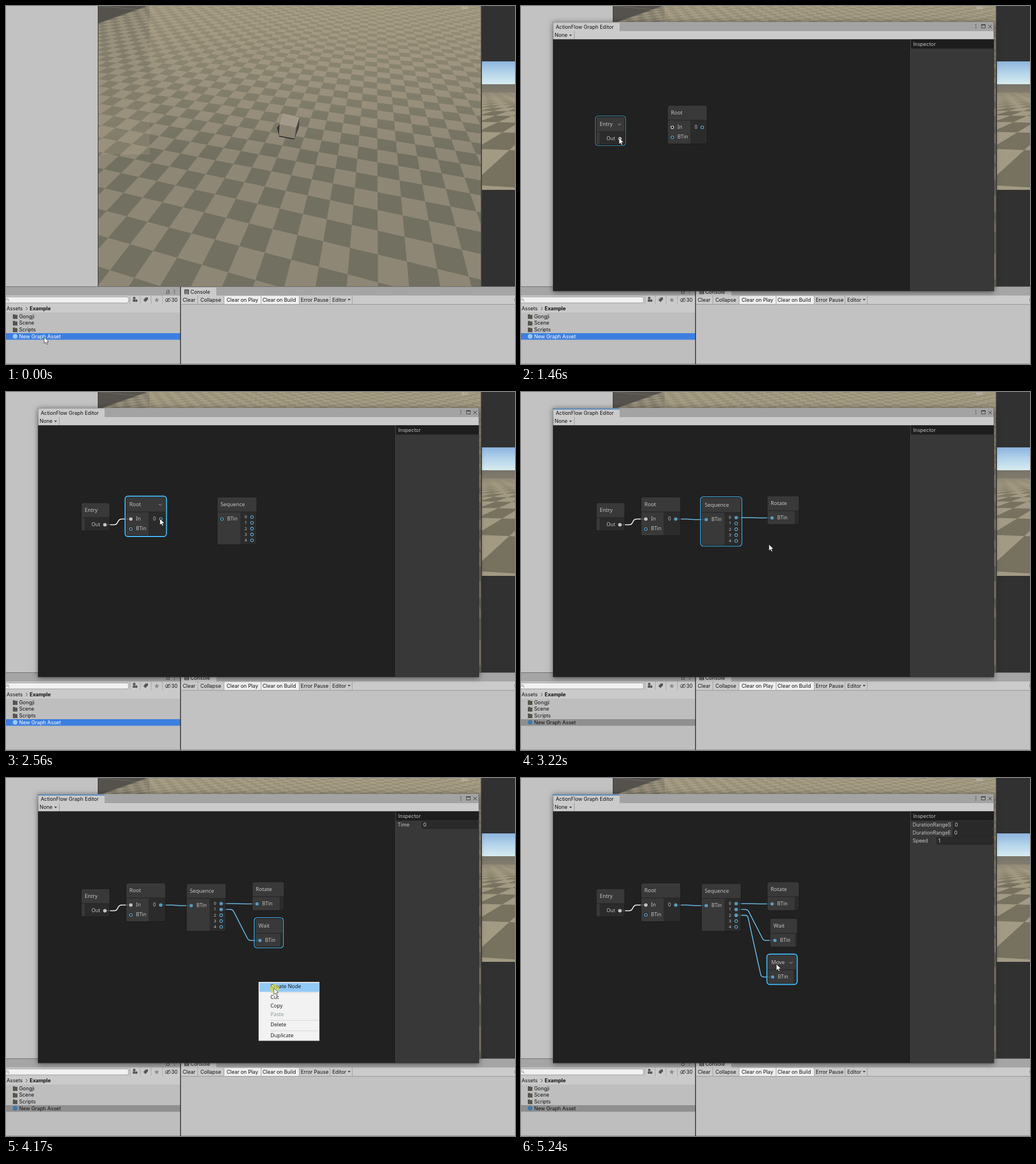
These frames come from a looping animation (893x627 px, 6.27 s). An HTML page with a canvas:

```html
<!DOCTYPE html>
<html lang="en">
<head>
<meta charset="utf-8">
<title>Graph editor demo</title>
<style>
  html, body { margin: 0; width: 100%; height: 100%; overflow: hidden; background: #c2c2c2; }
  canvas { display: block; width: 893px; height: 627px; }
</style>
</head>
<body>
<canvas id="stage" width="893" height="627"></canvas>
<script>
const ctx = document.getElementById('stage').getContext('2d');
const UI = '8.9px Inter, sans-serif';
const TITLE = '9.3px "Noto Sans", sans-serif';
const PORT = '8.7px "Noto Sans", sans-serif';
const SMALL = '7.6px "Noto Sans", sans-serif';
const MENU = '9.2px "Open Sans", sans-serif';
const BLUE = '#6cb9e6', WHITE = '#f2f2f2', SELECT = '#44b8f4';

// Timing: [start ms, end ms, number of steps]; everything below is scheduled in steps.
const LOOP = 6270;
const BURSTS = [[110, 670, 6], [780, 1340, 6], [1460, 2040, 6], [2160, 2680, 6],
  [2790, 3330, 6], [3430, 3950, 6], [4070, 4690, 7], [4810, 5240, 5]];

function stepAt(ms) {
  let step = 0;
  for (const [start, end, count] of BURSTS) {
    if (ms < start) break;
    const size = (end - start) / (count - 1);
    step += 1 + Math.min(count - 1, Math.floor((ms - start + 20) / size));
    if (ms < end) break;
  }
  return step;
}

// Piecewise linear position from [step, x, y] keys.
function along(keys, step) {
  const next = keys.findIndex(k => k[0] > step);
  if (next === 0) return keys[0].slice(1);
  if (next < 0) return keys[keys.length - 1].slice(1);
  const [a, ax, ay] = keys[next - 1], [b, bx, by] = keys[next];
  const u = (step - a) / (b - a);
  return [ax + (bx - ax) * u, ay + (by - ay) * u];
}
const within = (ranges, step) => ranges.find(r => step >= r[0] && step < r[1]);

const CURSOR = [[0, 67, 580], [2, 67, 580], [5, 255, 175], [6, 255, 175], [7, 280, 184], [9, 280, 184],
  [13, 172, 231], [14, 190, 228], [16, 265, 212], [17, 285, 187], [18, 238, 197], [19, 370, 184],
  [20, 397, 194], [22, 397, 194], [23, 270, 222], [24, 340, 222], [25, 395, 197], [26, 341, 198],
  [27, 432, 182], [28, 405, 220], [29, 435, 267], [30, 435, 267], [31, 462, 277], [33, 462, 277],
  [34, 410, 262], [35, 445, 306], [36, 458, 259], [37, 443, 357], [38, 470, 368], [40, 470, 368],
  [42, 377, 240], [45, 452, 396], [46, 458, 373], [48, 448, 326]];
const CLICKS = [1, 2, 8, 21, 27, 32, 38, 39];
const MENUS = [[6, 9, 255, 175], [19, 22, 370, 184], [27, 28, 432, 182], [30, 33, 435, 267], [37, 41, 443, 357]];
const FOCUS = [[14, 21], [24, 27], [29, 32], [35, 40], [43, 99]];
const SELECTED = [[14, 17, 'Entry'], [17, 25, 'Root'], [25, 36, 'Sequence'], [36, 43, 'Wait'],
  [43, 46, 'Sequence'], [46, 99, 'Move']];
const WINDOW_OPENS = 3;

// split: width of the input column
const NODES = {
  Entry: { born: 3, w: 50, h: 49, split: 6, keys: [[0, 132, 194]] },
  Root: { born: 11, w: 69.5, h: 67.5, split: 40, keys: [[17, 257, 174], [18, 210.5, 184]] },
  Sequence: { born: 22, w: 69.5, h: 83.5, split: 41, keys: [[25, 370.5, 184], [26, 316.5, 185]] },
  Rotate: { born: 28, w: 56, h: 50, split: 48, keys: [[0, 432, 182]] },
  Wait: { born: 33, w: 48, h: 50, split: 44, keys: [[35, 437, 267], [36, 437, 246]] },
  Move: { born: 41, w: 50, h: 50, split: 45, keys: [[46, 443, 357], [48, 433, 310]] }
};
// Drag starts at `from`, connects at `to`.
const EDGES = [
  { a: 'Entry', out: 0, b: 'Root', from: 14, to: 16, color: WHITE },
  { a: 'Root', out: 0, b: 'Sequence', from: 24, to: 25, color: BLUE },
  { a: 'Sequence', out: 0, b: 'Rotate', from: 28, to: 29, color: BLUE },
  { a: 'Sequence', out: 1, b: 'Wait', from: 34, to: 35, color: BLUE },
  { a: 'Sequence', out: 2, b: 'Move', from: 43, to: 45, color: BLUE }
];
const FIELDS = {
  Wait: [['Time', '0', 730]],
  Move: [['DurationRangeS', '0', 759], ['DurationRangeE', '0', 758], ['Speed', '1', 730]]
};

function rect(x, y, w, h, color) {
  ctx.fillStyle = color;
  ctx.fillRect(x, y, w, h);
}
function text(str, x, y, color = '#111', font = UI) {
  ctx.font = font;
  ctx.fillStyle = color;
  ctx.textBaseline = 'middle';
  ctx.fillText(str, x, y);
}
function poly(points, fill) {
  ctx.beginPath();
  points.forEach(p => ctx.lineTo(...p));
  ctx.closePath();
  ctx.fillStyle = fill;
  ctx.fill();
}
function stroke(points, color, width = 1) {
  ctx.beginPath();
  points.forEach(p => ctx.lineTo(...p));
  ctx.strokeStyle = color;
  ctx.lineWidth = width;
  ctx.stroke();
}
function disc(x, y, r, color) {
  ctx.beginPath();
  ctx.arc(x, y, r, 0, 7);
  ctx.fillStyle = color;
  ctx.fill();
}
function roundBox(x, y, w, h, r, fill, line, width = 1) {
  ctx.beginPath();
  ctx.roundRect(x, y, w, h, r);
  if (fill) { ctx.fillStyle = fill; ctx.fill(); }
  if (line) { ctx.strokeStyle = line; ctx.lineWidth = width; ctx.stroke(); }
}
function fade(x, y, w, h, ...stops) {
  const g = ctx.createLinearGradient(0, y, 0, y + h);
  stops.forEach((c, i) => g.addColorStop(i / (stops.length - 1), c));
  rect(x, y, w, h, g);
}
const arrowDown = (x, y) => poly([[x, y], [x + 5, y], [x + 2.5, y + 3]], '#444');

// Checkered plane from its horizon and the two vanishing points on it.
function checker(p) {
  const at = (i, j) => {
    const u = p.u0 + i * p.du, v = p.v0 + j * p.dv;
    const depth = (p.right - p.left) / (v - u);
    return [p.right + u * depth, p.horizon + depth];
  };
  const [i0, i1] = p.columns, [j0, j1] = p.rows;
  poly([at(i0, j0), at(i1, j0), at(i1, j1), at(i0, j1)], p.light);
  for (let i = i0; i < i1; i++)
    for (let j = j0; j < j1; j++)
      if ((i + j) % 2 === 0) poly([at(i, j), at(i + 1, j), at(i + 1, j + 1), at(i, j + 1)], p.dark);
}

function clipped(x, y, w, h, draw) {
  ctx.save();
  ctx.beginPath();
  ctx.rect(x, y, w, h);
  ctx.clip();
  draw();
  ctx.restore();
}

function drawScene() {
  rect(0, 0, 893, 492, '#c2c2c2');
  clipped(162, 0, 672, 492, () => {
    rect(162, 0, 672, 492, '#55524d');
    stroke([[162, 0], [252, 8]], '#6b6862');
    checker({ horizon: -141, right: 650, left: -1730, u0: -0.169, du: 0.0865, v0: 4.134, dv: 0.322,
      columns: [-31, 22], rows: [-6, 50], light: '#8f8776', dark: '#727061' });
    fade(252, 0, 582, 260, 'rgba(205,190,155,.42)', 'rgba(205,190,155,0)');
    poly([[162, 32], [252, 0], [252, 260], [162, 260]], 'rgba(205,190,155,.18)');
    text('Iso', 798, 2, 'rgba(235,235,235,.7)', UI);
    poly([[480, 207], [475.5, 213], [479, 228]], '#33343a');
    poly([[515, 195], [509, 213], [506, 233], [514, 213]], '#484644');
    poly([[480, 207], [509, 213], [506, 233], [479, 228]], '#8b8372');
    poly([[486, 188], [515, 195], [509, 213], [480, 207]], '#a3998a');
    stroke([[479, 228], [506, 233]], '#25262a', 1.5);
  });
  rect(161, 0, 1, 492, '#3a3a3a');
  rect(834, 0, 59, 492, '#313131');
  clipped(835, 97, 58, 225, () => {
    fade(835, 97, 58, 41, '#8db5df', '#b5d5ea', '#d9edf0');
    checker({ horizon: 137, right: 1010, left: -2000, u0: 0, du: 0.55, v0: 16, dv: 9,
      columns: [-30, 8], rows: [-1, 20], light: '#a39a84', dark: '#77725f' });
    fade(835, 137, 58, 50, '#77736a', 'rgba(165,155,130,.7)', 'rgba(165,155,130,0)');
  });
  rect(833, 0, 1.5, 492, '#4a4a4a');
}

function drawPanels(focused) {
  rect(0, 491, 893, 1, '#6e6e6e');
  rect(0, 492, 893, 15, '#a5a5a5');
  rect(0, 507, 893, 16, '#cbcbcb');
  rect(0, 522, 306, 15, '#cacaca');
  rect(0, 537, 306, 90, '#bebebe');
  rect(307, 522, 586, 105, '#c2c2c2');
  rect(307, 522, 586, 1, '#999');
  rect(0, 626, 893, 1, '#999');

  // Project browser
  roundBox(281.5, 500, 5, 3.5, 0, null, '#555');
  stroke([[285.5, 500], [285.5, 497.5], [282.5, 497.5]], '#555');
  [497, 500, 503].forEach(y => disc(295.5, y, 0.8, '#444'));
  roundBox(-5, 509.5, 220, 10.5, 3, '#f1f1f1', '#9a9a9a');
  ctx.beginPath();
  ctx.arc(2.5, 514, 1.7, 0, 7);
  ctx.stroke();
  stroke([[4, 515.5], [6, 517.5]], '#777');
  [217, 235, 254, 274].forEach(x => rect(x, 507, 1, 15, '#aaa'));
  disc(225, 511.5, 2.3, '#555');
  rect(222.5, 514, 4, 4, '#555');
  disc(228.5, 516, 2.2, '#555');
  poly([[241, 515], [245, 510.5], [249, 510.5], [249, 514], [244.5, 518.5]], '#555');
  poly(Array.from({ length: 10 }, (_, i) => {
    const r = i % 2 ? 2 : 4.6, a = i * Math.PI / 5 - Math.PI / 2;
    return [264.5 + r * Math.cos(a), 515 + r * Math.sin(a)];
  }), '#888');
  ctx.beginPath();
  ctx.ellipse(284, 515, 4.5, 2.6, 0, 0, 7);
  ctx.strokeStyle = '#444';
  ctx.stroke();
  disc(284, 515, 1.3, '#444');
  stroke([[280, 518.5], [288, 510.5]], '#444');
  text('30', 290, 515);
  text('Assets', 1, 530);
  stroke([[35, 527], [37.5, 530], [35, 533]], '#555');
  text('Example', 41.5, 530, '#111', 'bold ' + UI);
  ['Gongji', 'Scene', 'Scripts'].forEach((name, i) => {
    const y = 544 + i * 11.6;
    rect(12, y - 4, 4, 2, '#56534c');
    rect(12, y - 3, 8, 7, '#56534c');
    text(name, 23, y);
  });
  rect(0, 573, 306, 11.5, focused ? '#8f8f8f' : '#3d7fe0');
  disc(16, 578.5, 4, focused ? '#3d78ae' : '#9cc9f5');
  text('New Graph Asset', 23, 579, focused ? '#111' : '#fff');
  rect(305.5, 492, 1.5, 135, '#333');

  // Console
  rect(307, 493, 62, 14, '#cbcbcb');
  rect(313, 496.5, 8, 8, '#444');
  [499, 501, 503].forEach(y => rect(314, y - 0.4, 6, 0.8, '#ccc'));
  text('Console', 323.5, 501);
  rect(383, 508, 64, 14, '#efefef');
  rect(448, 508, 66, 14, '#efefef');
  [336, 382, 447, 514, 568, 607].forEach(x => rect(x, 507, 1, 15, '#a3a3a3'));
  [['Clear', 310], ['Collapse', 341], ['Clear on Play', 387], ['Clear on Build', 450],
    ['Error Pause', 517], ['Editor', 572.5]].forEach(([s, x]) => text(s, x, 515));
  arrowDown(599.5, 513);
  rect(892, 512, 1, 5, '#888');
}

function drawWindow(focused) {
  ctx.save();
  ctx.shadowColor = 'rgba(0,0,0,.5)';
  ctx.shadowBlur = 9;
  ctx.shadowOffsetY = 1;
  rect(56, 28, 774, 471.5, '#333');
  ctx.restore();
  rect(56.5, 28, 773, 16, '#a3a3a3');
  rect(56.5, 29.5, 116.5, 14.5, '#cbcbcb');
  if (focused) rect(56.5, 29, 116.5, 1.5, '#3a79bb');
  text('ActionFlow Graph Editor', 61, 37.5);
  [32, 35, 38].forEach(y => disc(798, y + 0.5, 0.8, '#333'));
  roundBox(808, 32.5, 6.5, 6, 0, null, '#444');
  rect(807.5, 32, 7.5, 2, '#444');
  stroke([[820, 33], [826, 39]], '#444');
  stroke([[826, 33], [820, 39]], '#444');
  rect(56.5, 44, 773, 14.5, '#cbcbcb');
  text('None', 59, 51.5);
  arrowDown(84.5, 50);
  rect(93, 44, 1, 14, '#999');
  rect(56.5, 58.5, 627, 440, '#212121');
  rect(683, 58.5, 1, 440, '#454545');
  rect(684, 58.5, 145, 440, '#383838');
  rect(684, 58.5, 145, 16, '#1d1d1d');
  text('Inspector', 688, 67, '#c0c0c0');
}

function drawInspector(name) {
  (FIELDS[name] || []).forEach(([label, value, x], i) => {
    const y = 82.5 + i * 13.8;
    text(label, 687, y, '#c4c4c4');
    roundBox(x - 0.5, y - 6, 828 - x, 12, 2, '#2a2a2a', '#222');
    text(value, x + 2, y, '#d0d0d0');
  });
}

const outPort = (name, [x, y], i) =>
  name === 'Entry' ? [x + 41.5, y + 38.5] : [x + 61, y + (name === 'Root' ? 38.5 : 35 + i * 10.2)];
const inPort = ([x, y]) => [x + 8.5, y + 38.5];

function drawEdge([ax, ay], [bx, by], color) {
  const lead = Math.min(20, Math.abs(bx - ax) / 2);
  ctx.beginPath();
  ctx.moveTo(ax, ay);
  ctx.arcTo(ax + lead, ay, bx - lead, by, 6);
  ctx.arcTo(bx - lead, by, bx, by, 6);
  ctx.lineTo(bx, by);
  ctx.strokeStyle = color;
  ctx.lineWidth = 1.6;
  ctx.stroke();
}

function drawPort([x, y], color, linked) {
  disc(x, y, 3.8, '#212121');
  ctx.beginPath();
  ctx.arc(x, y, 2.5, 0, 7);
  ctx.strokeStyle = color;
  ctx.lineWidth = 1.1;
  ctx.stroke();
  if (linked) disc(x, y, 1.5, color);
}

function drawNode(name, pos, step, hovered, selected) {
  const { w, h, split } = NODES[name], [x, y] = pos;
  ctx.save();
  ctx.beginPath();
  ctx.roundRect(x, y, w, h, 3);
  ctx.clip();
  rect(x, y, w, 26, 'rgba(63,63,63,.8)');
  rect(x, y + 26, split, h - 26, 'rgba(63,63,63,.8)');
  rect(x + split, y + 26, w - split, h - 26, 'rgba(46,46,46,.8)');
  rect(x, y + 25.5, w, 1, '#232323');
  ctx.restore();
  roundBox(x, y, w, h, 3, null, '#191919', 0.8);
  if (hovered || selected)
    roundBox(x - 1.5, y - 1.5, w + 3, h + 3, 5, null, selected ? SELECT : '#37819f', hovered && selected ? 1.9 : 1.2);
  text(name, x + 6, y + 13, '#c4c4c4', TITLE);
  if (hovered) stroke([[x + w - 12, y + 12], [x + w - 9.3, y + 14.7], [x + w - 6.6, y + 12]], '#aaa');

  const linkedOut = i => EDGES.some(e => e.a === name && e.out === i && step >= e.from);
  const linkedIn = EDGES.some(e => e.b === name && step >= e.to);
  const label = (s, lx, ly, font = PORT) => text(s, lx, ly, '#c4c4c4', font);
  const [ix, iy] = inPort(pos);
  if (name === 'Entry') {
    label('Out', x + 18, y + 38.5);
    drawPort(outPort(name, pos, 0), WHITE, hovered || linkedOut(0));
    return;
  }
  const root = name === 'Root';
  label(root ? 'In' : 'BTin', ix + 9, iy);
  drawPort([ix, iy], root ? WHITE : BLUE, linkedIn);
  if (root) {
    label('BTin', ix + 9, iy + 17.5);
    drawPort([ix, iy + 17.5], BLUE, false);
  }
  const outs = { Root: 1, Sequence: 5 }[name] || 0;
  for (let i = 0; i < outs; i++) {
    const p = outPort(name, pos, i);
    label(String(i), p[0] - (root ? 13.5 : 13), p[1], root ? PORT : SMALL);
    drawPort(p, BLUE, linkedOut(i));
  }
}

function drawMenu(x, y, [cx, cy]) {
  rect(x, y, 107, 103.5, '#b8b8b8');
  rect(x + 0.7, y + 0.7, 105.6, 102, '#f2f2f2');
  if (cx > x + 5 && cy > y + 2) rect(x + 2, y + 2, 104, 15.5, '#91c9f7');
  [18.5, 67, 85.5].forEach(dy => rect(x + 20, y + dy, 85, 0.8, '#cfcfcf'));
  [['Create Node', 9], ['Cut', 27.5], ['Copy', 42.5], ['Paste', 57.5], ['Delete', 76], ['Duplicate', 94.5]]
    .forEach(([s, dy]) => text(s, x + 21, y + dy, s === 'Paste' ? '#86958b' : '#111', MENU));
}

function drawCursor([x, y], clicked) {
  if (clicked) disc(x + 1, y + 1, 8, 'rgba(222,220,50,.65)');
  const shape = [[0, 0], [0, 11], [2.6, 8.8], [4.4, 12.6], [6.2, 11.8], [4.5, 8], [8, 7.8]]
    .map(([dx, dy]) => [x + dx, y + dy]);
  poly(shape, '#fff');
  stroke([...shape, shape[0]], '#222', 0.7);
}

function render(step) {
  const focused = !!within(FOCUS, step);
  const cursor = along(CURSOR, step);
  drawScene();
  drawPanels(focused);
  if (step >= WINDOW_OPENS) {
    const menu = within(MENUS, step);
    const selected = (within(SELECTED, step) || [])[2];
    const spots = {};
    for (const name in NODES) if (step >= NODES[name].born) spots[name] = along(NODES[name].keys, step);
    drawWindow(focused);
    drawInspector(selected);
    for (const e of EDGES)
      if (step >= e.from) drawEdge(outPort(e.a, spots[e.a], e.out), step < e.to ? cursor : inPort(spots[e.b]), e.color);
    for (const name in spots) {
      const [x, y] = spots[name], { w, h } = NODES[name];
      const hovered = !menu && cursor[0] > x && cursor[0] < x + w && cursor[1] > y && cursor[1] < y + h;
      drawNode(name, spots[name], step, hovered, name === selected);
    }
    if (menu) drawMenu(menu[2], menu[3], cursor);
  }
  drawCursor(cursor, CLICKS.includes(step));
}

let shown = -1;
const begin = performance.now();
function tick() {
  const step = stepAt((performance.now() - begin) % LOOP);
  if (step !== shown) render(shown = step);
  requestAnimationFrame(tick);
}
tick();
</script>
</body>
</html>
```
